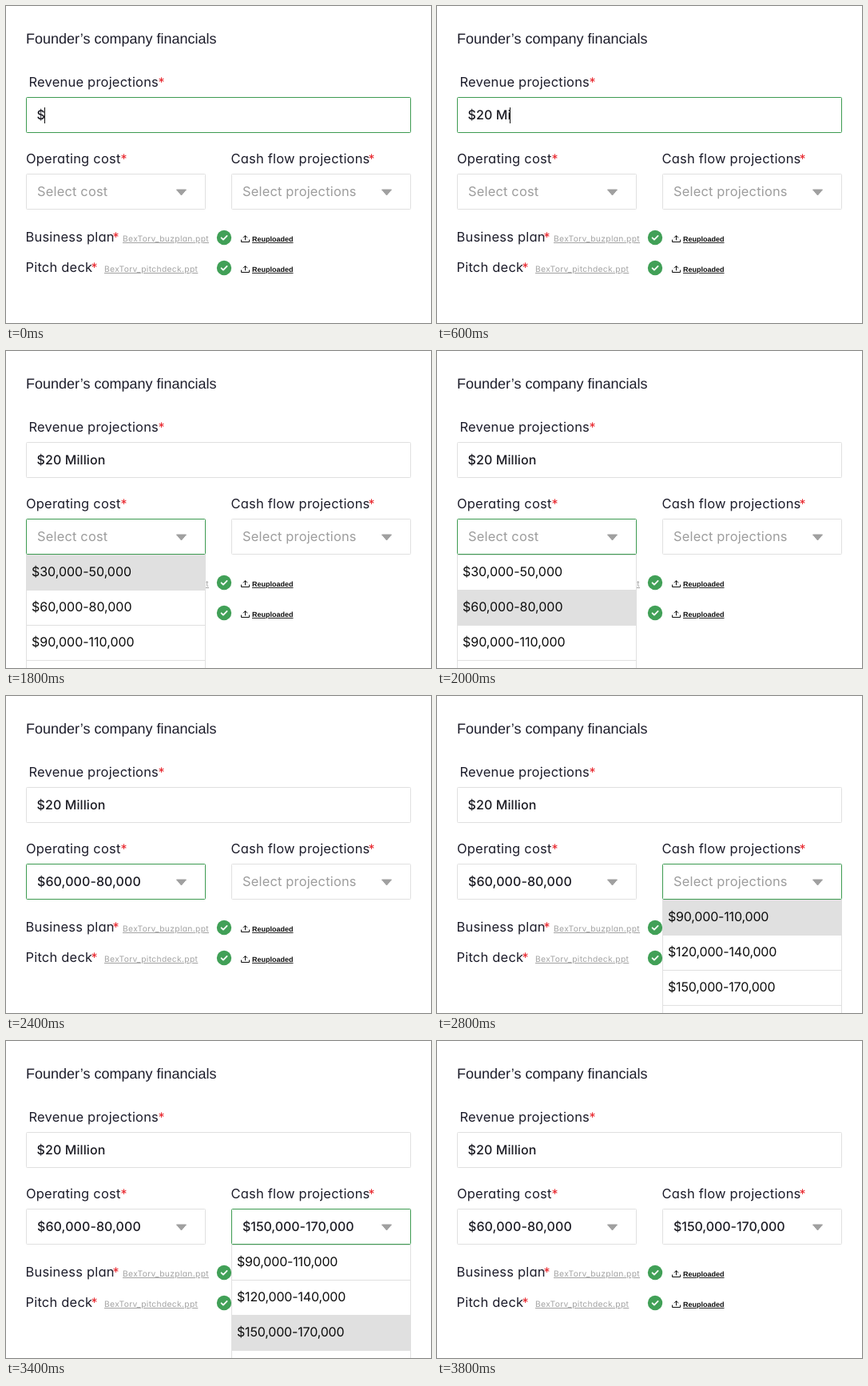
These frames come from a looping animation (532x397 px, 4 s). An HTML page:

```html
<!DOCTYPE html>
<html lang="en">
<head>
<meta charset="utf-8">
<title>Company financials form</title>
<style>
  html, body { margin: 0; width: 100%; height: 100%; overflow: hidden; background: #fff; }
  svg { display: block; width: 532px; height: 397px; }
  text {
    font: 400 16px Inter, "Open Sans", sans-serif;
    font-feature-settings: "cv11";
    text-rendering: geometricPrecision;
    fill: #1d1d2b;
  }
  .title { font: 18px "Liberation Sans", Arial, sans-serif; }
  .label { font-size: 16.5px; letter-spacing: .2px; }
  .star { fill: #e8262d; }
  .value { font-weight: 500; fill: #1c1c24; letter-spacing: .1px; }
  .cash .value { letter-spacing: -.04px; }
  .value.empty, .cash .value.empty { font-weight: 400; font-size: 16.4px; fill: #9d9d9d; letter-spacing: .2px; }
  .option { fill: #0c0c0c; letter-spacing: -.02px; }
  .cash .option { letter-spacing: -.18px; }
  .file, .again { text-decoration: underline; text-decoration-skip-ink: none; text-decoration-thickness: 1px; text-underline-offset: 1.5px; }
  .file { font-size: 10.3px; letter-spacing: .33px; fill: #a3a3a3; }
  .again { font: 700 9px "Liberation Sans", Arial, sans-serif; fill: #111; }
  .box { fill: #fff; stroke: #e0e0e0; }
  .box.active { stroke: #3c9a50; }
  .arrow { fill: #a0a0a0; stroke: #a0a0a0; stroke-linejoin: round; }
  .line { fill: none; stroke: #e0e0e0; }
  .hover { fill: #e0e0e0; }
  .disc { fill: #41a057; }
  .tick { fill: none; stroke: #fff; stroke-width: 1.8; stroke-linecap: round; stroke-linejoin: round; }
  .upload { fill: none; stroke: #111; stroke-linejoin: round; stroke-linecap: round; }
</style>
</head>
<body>
<svg id="stage" viewBox="0 0 532 397"></svg>
<script>
const STEP = 200, STEPS = 20;
const ROW = 44, LIST_TOP = 255;
const stage = document.getElementById("stage");

function add(parent, tag, cls, attrs = {}, content = "") {
  const node = document.createElementNS("http://www.w3.org/2000/svg", tag);
  node.setAttribute("class", cls);
  for (const key in attrs) node.setAttribute(key, attrs[key]);
  node.textContent = content;
  parent.append(node);
  return node;
}

const write = (parent, cls, x, y, content) => add(parent, "text", cls, { x, y }, content);

function label(content, x, y, starX) {
  write(stage, "label", x, y, content);
  write(stage, "star", starX, y, "*");
}

const box = (parent, x, y, width) =>
  add(parent, "rect", "box", { x: x + .5, y: y + .5, width: width - 1, height: 44, rx: 1 });

function fileRow(y, file, fileX) {
  write(stage, "file", fileX, y + 5, file);
  const mark = add(stage, "g", "", { transform: `translate(0 ${y})` });
  add(mark, "circle", "disc", { cx: 273, cy: 0, r: 9.2 });
  add(mark, "path", "tick", { d: "M269.6 .3l2.4 2.4 4.6-4.8" });
  add(mark, "path", "upload", { d: "M294.5 3v2.5h10v-2.5M299.5 3v-5M297.2 0l2.3-2.3 2.3 2.3" });
  write(mark, "again", 308, 5, "Reuploaded");
}

function select(x, cls, placeholder, options) {
  const group = add(stage, "g", cls);
  const frame = box(group, x, 210, 225);
  const value = write(group, "value", x + 14, 238, "");
  add(group, "path", "arrow", { d: `M${x + 188.5} 230h12l-6 7z` });

  const list = add(group, "g", "");
  add(list, "rect", "box", { x: x + .5, y: LIST_TOP + .5, width: 224, height: 160 });
  const hover = add(list, "rect", "hover", { x: x + 1, width: 223, height: ROW - 1 });
  options.forEach((option, i) => {
    const y = LIST_TOP + ROW * i;
    add(list, "path", "line", { d: `M${x + 1} ${y + ROW + .5}h223` });
    write(list, "option", x + 7, y + 27, option);
  });
  // keep the field's bottom edge above the list
  group.insertBefore(list, frame);

  return (active, row, picked) => {
    frame.classList.toggle("active", active);
    value.classList.toggle("empty", !picked);
    value.textContent = picked || placeholder;
    list.style.display = row < 0 ? "none" : "";
    hover.setAttribute("y", LIST_TOP + 1 + ROW * Math.max(row, 0));
  };
}

write(stage, "title", 25, 47, "Founder’s company financials");
label("Revenue projections", 28.5, 101, 190.5);
label("Operating cost", 25, 197, 143.5);
label("Cash flow projections", 281.5, 197, 453.5);
label("Business plan", 24.5, 295, 133.5);
label("Pitch deck", 24.5, 333, 106.5);
fileRow(290, "BexTorv_buzplan.ppt", 146);
fileRow(328, "BexTorv_pitchdeck.ppt", 123);

const revenue = box(stage, 25, 114, 482);
const amount = write(stage, "value", 38.5, 142, "");
const caret = add(stage, "rect", "", { y: 127, width: 1, height: 20, fill: "#111" });

const setCost = select(25, "cost", "Select cost",
  ["$30,000-50,000", "$60,000-80,000", "$90,000-110,000"]);
const setCash = select(282, "cash", "Select projections",
  ["$90,000-110,000", "$120,000-140,000", "$150,000-170,000"]);

const FULL = "$20 Million";
const CARET_X = [48, 59, 87, 91, 95, 100, 104, 115];

function show(step) {
  // "0", the space and "M" arrive together
  amount.textContent = FULL.slice(0, step < 2 ? step + 1 : step + 3);
  revenue.classList.toggle("active", step < 9);
  const typing = step < CARET_X.length;
  caret.style.display = typing ? "" : "none";
  if (typing) caret.setAttribute("x", CARET_X[step]);

  const costRow = step < 9 || step > 11 ? -1 : Math.min(step - 9, 1);
  setCost(step >= 9 && step < 13, costRow, step >= 11 && "$60,000-80,000");

  const cashRow = step < 14 || step > 17 ? -1 : Math.min(step - 14, 2);
  setCash(step >= 13 && step < 19, cashRow, step >= 17 && "$150,000-170,000");
}

let last = 0;
show(0);
const start = performance.now();
function tick() {
  const step = Math.floor((performance.now() - start) / STEP) % STEPS;
  if (step !== last) show(last = step);
  requestAnimationFrame(tick);
}
requestAnimationFrame(tick);
</script>
</body>
</html>
```
